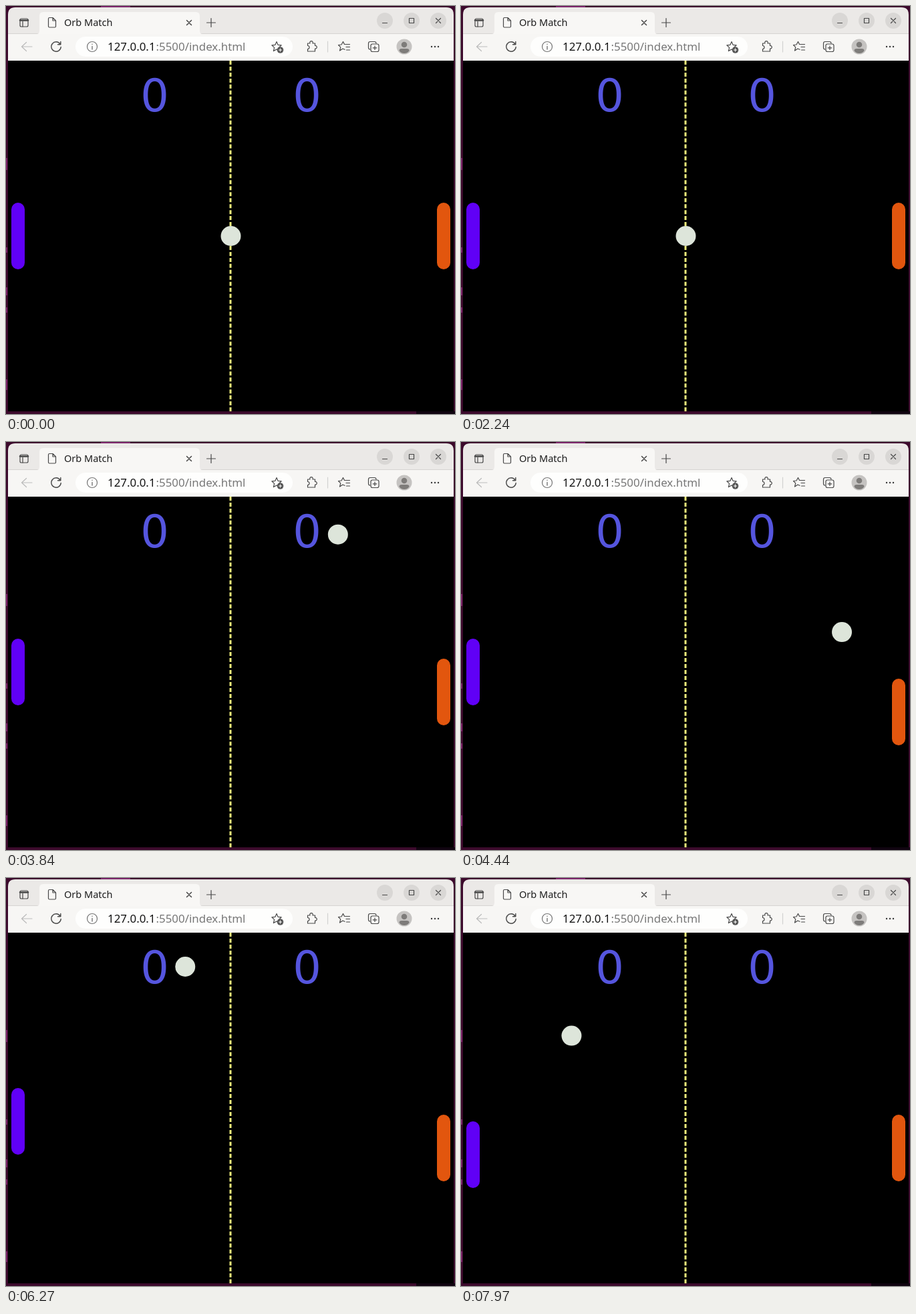
An HTML page for the animation above (8 s loop, 672 by 612 pixels).

```html
<!DOCTYPE html>
<html lang="en">
<head>
<meta charset="utf-8">
<title>Orb Match</title>
<style>
  html, body { margin: 0; width: 100%; height: 100%; overflow: hidden; background: #3c0a2c; }
  svg { display: block; width: 672px; height: 612px; }
  text { font-family: "Noto Sans", "Open Sans", sans-serif; }
  .score { font: 67px "DejaVu Sans", sans-serif; fill: #5555de; text-anchor: middle; }
  .icon { fill: none; stroke: #484848; stroke-width: 1.2; stroke-linecap: round; stroke-linejoin: round; }
</style>
</head>
<body>
<svg viewBox="0 0 672 612">
  <defs>
    <clipPath id="page"><rect x="3" y="82" width="667" height="526"/></clipPath>
    <path id="star" d="M0-7.5 2.2-2.6 7.2-2.2 3.4 1.4 4.6 6.6 0 3.9-4.6 6.6-3.4 1.4-7.2-2.2-2.2-2.6Z"/>
  </defs>

  <!-- desktop edge -->
  <rect width="672" height="612" fill="#3c0a2c"/>
  <path d="M614 610H672" stroke="#100410" stroke-width="4"/>
  <path d="M1 228v18M1 362v8M1 422v12M1 452v8M1 560v16M142 1h44" stroke="#7a2468" stroke-width="2"/>

  <!-- window frame -->
  <path d="M3 82V13Q3 2 14 2H659Q670 2 670 13V82Z" fill="#ebe9e7"/>
  <rect x="3" y="41" width="667" height="41" fill="#f7f6f4"/>
  <path d="M3 41.500H670" stroke="#d6d4d2"/>
  <path d="M46 42Q50 42 50 37V15Q50 9 56 9H284Q290 9 290 15V37Q290 42 294 42Z" fill="#f8f7f5"/>
  <rect x="104" y="46" width="325" height="30" rx="15" fill="#fefefd"/>
  <g fill="#d9d7d5">
    <circle cx="567" cy="22" r="12"/><circle cx="607" cy="22" r="12"/><circle cx="647" cy="22" r="12"/>
  </g>

  <!-- tab strip -->
  <g class="icon" stroke="#2b2b2b">
    <rect x="21" y="19" width="12" height="12" rx="2"/>
    <path d="M21 21.500H33" stroke-width="2.400"/><path d="M25 23V31"/>
    <path d="M63.500 19Q63.500 17.500 65 17.500H70L74.500 22V30.500Q74.500 32 73 32H65Q63.500 32 63.500 30.500ZM70 17.500V22H74.500"/>
    <path d="M270.500 21.500l7 7m0-7l-7 7" stroke-width="1.500"/>
    <path d="M300.500 25H313.500M307 18.500V31.500"/>
    <path d="M563.500 25.500H570.500M643.500 18.500l7 7m0-7l-7 7"/>
    <rect x="603.500" y="18.500" width="7" height="7"/>
  </g>
  <text x="87" y="30" font-size="14.500" font-weight="500" fill="#1c1c1c">Orb Match</text>

  <!-- toolbar -->
  <g class="icon">
    <path d="M39 61H23.500L30.500 54.500M23.500 61L30.500 67.500" stroke="#bbb"/>
    <path d="M81 57A7.200 7.200 0 1 0 82.200 61.500M81.800 53.500V57.700H77.500" stroke-width="1.400"/>
    <circle cx="129" cy="61" r="7.500" stroke="#747474"/>
    <path d="M129 60.500V65M129 57.200V57.500" stroke="#747474" stroke-width="1.400"/>
    <use href="#star" x="405" y="61"/>
    <path d="M451.500 56H455A2.300 2.300 0 1 1 459 56H462.500V59.500A2.300 2.300 0 1 1 462.500 64V68H451.500V64.500A2.300 2.300 0 1 0 451.500 59.500Z"/>
    <path d="M481.500 53V69" stroke="#d2d2d0"/>
    <path d="M507 65.300 504 64 499.500 67 500.800 61.800 497.500 58.500 502 58 504.500 53.500 506.500 57.500H514.500M509 61.500H514.500M509.500 66H514.500"/>
    <path d="M545 65Q542.500 65 542.500 62.500V56Q542.500 53.500 545 53.500H551.500Q554 53.500 554 56"/>
    <rect x="546" y="57" width="12" height="11.500" rx="2.500"/>
    <path d="M552 60V65.500M549.200 62.800H554.800"/>
  </g>
  <circle cx="410.500" cy="66" r="4.800" fill="#585858"/>
  <path d="M408 66H413M410.500 63.500V68.500" stroke="#fefefd"/>
  <circle cx="596" cy="61" r="11.500" fill="#c5c3c1"/>
  <circle cx="596" cy="58" r="4.300" fill="#7e7c7a"/>
  <path d="M588.500 67Q588.500 64 592 64H600Q603.500 64 603.500 67 601 71 596 71T588.500 67Z" fill="#7e7c7a"/>
  <g fill="#383838"><circle cx="637" cy="61" r="1.200"/><circle cx="642" cy="61" r="1.200"/><circle cx="647" cy="61" r="1.200"/></g>
  <text y="67" font-size="16.900"><tspan x="152" fill="#141414">127.0.0.1</tspan><tspan x="224.500" fill="#777">:5500/index.html</tspan></text>

  <!-- game -->
  <g clip-path="url(#page)">
    <rect x="3" y="82" width="667" height="526"/>
    <path d="M336 82V608" stroke="#f0f07c" stroke-width="3" stroke-dasharray="6 2.966"/>
    <text class="score" x="222.500" y="157.500">0</text>
    <text class="score" x="450.500" y="157.500">0</text>
    <rect id="left" x="8" y="295" width="20" height="100" rx="10" fill="#6000f6"/>
    <rect id="right" x="645" y="295" width="20" height="100" rx="10" fill="#e2560e"/>
    <circle id="ball" r="15" fill="#dde5da"/>
  </g>
</svg>
<script>
  const LOOP = 8000, FPS = 30;
  const [left, right, ball] = ["left", "right", "ball"].map(id => document.getElementById(id));

  // Ball corners: [time, x, y], straight and steady in between.
  const path = [
    [0, 336.5, 345], [2505, 336.5, 345], [3602, 468, 81], [4438, 570, 285], [4817, 616, 377],
    [5505, 448, 209], [6050, 320, 81], [7005, 97, 305], [7339, 19, 383], [8000, 172, 230]
  ];

  function ballAt(t) {
    const i = path.findIndex(p => p[0] > t);
    const [t0, x0, y0] = path[i - 1], [t1, x1, y1] = path[i];
    const k = (t - t0) / (t1 - t0);
    return [x0 + (x1 - x0) * k, y0 + (y1 - y0) * k];
  }

  // A paddle moves down 10 px per key press.
  const paddleY = (t, start, presses) =>
    295 + 10 * Math.max(0, Math.min(presses, Math.floor((t - start) / 65) + 1));

  function draw(now) {
    const frame = Math.floor((now % LOOP + 1) * FPS / 1000);
    const t = Math.min(frame * 1000 / FPS + 5, LOOP - 1);
    const [x, y] = ballAt(t);
    ball.setAttribute("cx", x);
    ball.setAttribute("cy", y);
    right.setAttribute("y", paddleY(t, 3700, 6));
    left.setAttribute("y", paddleY(t, 6200, 7));
  }

  const start = performance.now();
  (function tick() {
    draw(performance.now() - start);
    requestAnimationFrame(tick);
  })();
</script>
</body>
</html>
```
